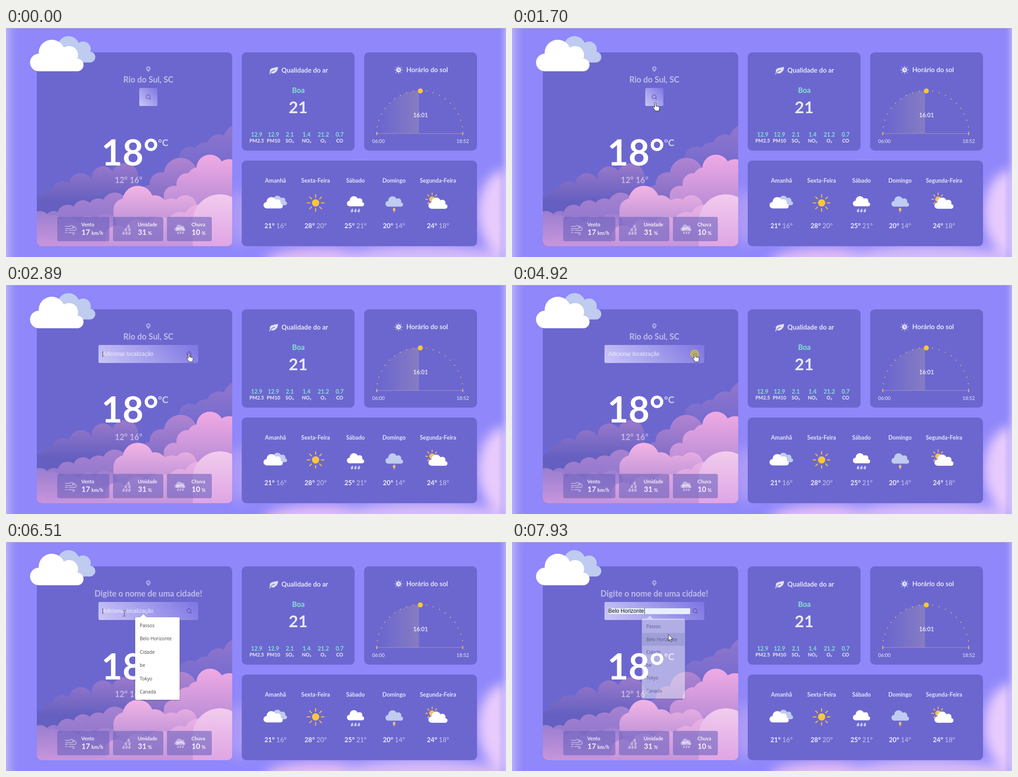
These frames come from a looping animation (1103x508 px, 8 s). An HTML page:

```html
<!DOCTYPE html>
<html lang="pt">
<head>
<meta charset="utf-8">
<style>
  html, body { margin: 0; width: 100%; height: 100%; overflow: hidden; background: #8f87fa; }
  svg { display: block; width: 1103px; height: 508px; }
  text { font-family: Lato, sans-serif; white-space: pre; }
  .field { font-family: "Liberation Sans", Arial, sans-serif; font-size: 12px; }
  .item { font-family: "Open Sans", "Noto Sans", sans-serif; font-size: 10.2px; fill: #444; }
</style>
</head>
<body>
<svg id="stage" viewBox="0 0 1103 508">
  <defs>
    <filter id="blur" x="-50%" y="-50%" width="200%" height="200%"><feGaussianBlur stdDeviation="13"/></filter>
    <filter id="shadow"><feDropShadow dx="0" dy="1" stdDeviation="1.5" flood-opacity=".3"/></filter>
    <linearGradient id="edge"><stop stop-color="#c9bdfc" stop-opacity=".75"/><stop offset="1" stop-color="#8f87fa" stop-opacity="0"/></linearGradient>
    <linearGradient id="day"><stop offset=".1" stop-color="#a89ab0" stop-opacity="0"/><stop offset="1" stop-color="#a89ab0" stop-opacity=".42"/></linearGradient>
    <linearGradient id="glass" gradientUnits="userSpaceOnUse"><stop stop-color="#cbc7f7"/><stop offset="1" stop-color="#7d75e2"/></linearGradient>
    <clipPath id="card"><rect x="68" y="54" width="431" height="430" rx="10"/></clipPath>
    <clipPath id="fieldClip"><rect id="fieldArea" y="133" height="40"/></clipPath>
    <g id="cloud">
      <circle cx="72.5" cy="76.5" r="19.5"/><circle cx="101" cy="55" r="29"/><circle cx="139" cy="60" r="20"/>
      <circle cx="157" cy="82" r="14"/><path d="M72 60h78v15l7 7v14H72z"/>
    </g>
    <g id="back" fill="#bfcbef">
      <circle cx="138" cy="42" r="24"/><circle cx="170" cy="47" r="17"/><circle cx="185" cy="64.5" r="12"/><path d="M138 45h46v31.500h-46z"/>
    </g>
    <path id="drop" d="M1.500-4.500C4-1 3 4 0 4S-4.200 0 1.500-4.500z"/>
  </defs>
  <rect width="1103" height="508" fill="#8f87fa"/>
  <g filter="url(#blur)">
    <ellipse cx="1103" cy="410" rx="62" ry="95" fill="#e8cbfd"/>
    <ellipse cx="690" cy="520" rx="120" ry="32" fill="#e3bdf5"/>
    <ellipse cx="920" cy="518" rx="190" ry="36" fill="#d6bbf9"/>
    <ellipse cx="515" cy="420" rx="22" ry="62" fill="#b09cf7"/>
  </g>
  <rect width="32" height="508" fill="url(#edge)"/>
  <rect width="18" height="508" fill="url(#edge)" transform="matrix(-1 0 0 1 1103 0)"/>
  <rect width="1103" height="1" fill="#b5b1c9"/>
  <g fill="#6c67cf">
    <rect x="68" y="54" width="431" height="430" rx="10"/>
    <rect x="520" y="54" width="249" height="218" rx="10"/>
    <rect x="790" y="54" width="249" height="218" rx="10"/>
    <rect x="520" y="294" width="519" height="190" rx="10"/>
  </g>
  <g id="sky" clip-path="url(#card)"></g>
  <use href="#back"/><use href="#cloud" fill="#fff"/>

  <path d="M314 98c-2-3-5-5-5-8a5 5 0 0 1 10 0c0 3-3 5-5 8zm0-10a2 2 0 1 0 .1 0z" fill="#a9a4e4"/>
  <g fill="#e1dff6" stroke="#e1dff6">
    <path d="M600 86c-7 3-19 1-18 11 2 5 9 5 13 1 4-3 5-7 5-12z" stroke="none"/>
    <path d="M582 102.500c2-5 6-8 11-9" fill="none" stroke="#6c67cf" stroke-width="1.300"/>
    <path d="M581.500 103c0-2 1-4 3-6" fill="none" stroke-width="1.500"/>
    <circle cx="866" cy="93" r="5.700" stroke="none"/>
    <path d="M866 90v3.500h3" fill="none" stroke="#6c67cf" stroke-width="1.200"/>
  </g>

  <path d="M818 234A95 95 0 0 1 911 139V234z" fill="url(#day)"/>
  <path d="M818 234H1008" stroke="#aa94bd"/>
  <path d="M818 230.500v7M1007.500 230.500v7" stroke="#f5c04c" stroke-width="2"/>
  <g id="arc" fill="#f3c24e"></g>
  <circle cx="914" cy="139.500" r="5.500" fill="#fac637"/>

  <g transform="translate(548.9 365.500) scale(.361)"><use href="#back"/><use href="#cloud" fill="#fff"/></g>
  <use href="#cloud" fill="#fff" transform="translate(735 364.600) scale(.322)"/>
  <g fill="#bfcbef">
    <use href="#drop" x="763" y="405"/><use href="#drop" x="770.500" y="405"/><use href="#drop" x="778" y="405"/>
    <use href="#cloud" transform="translate(819.500 364.600) scale(.33)"/>
  </g>
  <path d="M854.500 399h4.500l-2 4h3l-5.500 8 1.500-6h-3z" fill="#f9c860"/>
  <circle cx="683" cy="388" r="8" fill="#f9c73d"/>
  <circle cx="940" cy="380" r="6.500" fill="#f3c05e"/>
  <g id="rays"></g>
  <use href="#cloud" fill="#fff" transform="translate(913 366.700) scale(.356)"/>

  <g fill="#6a61be" fill-opacity=".58">
    <rect x="113" y="419" width="115" height="54" rx="4"/>
    <rect x="236" y="419" width="111" height="54" rx="4"/>
    <rect x="355" y="419" width="99" height="54" rx="4"/>
  </g>
  <g fill="#fff" fill-opacity=".42">
    <use href="#drop" x="270" y="440"/><use href="#drop" x="264" y="447"/><use href="#drop" x="272" y="447"/>
    <use href="#drop" x="259" y="455"/><use href="#drop" x="265.500" y="455"/><use href="#drop" x="272" y="455"/>
    <use href="#cloud" transform="translate(361.200 430.700) scale(.203)"/>
    <use href="#drop" transform="translate(379 454) scale(.75)"/><use href="#drop" transform="translate(384.500 454) scale(.75)"/><use href="#drop" transform="translate(390 454) scale(.75)"/>
  </g>
  <path d="M131 440h10m-10 5h13a3.500 3.500 0 1 0-3-5M148 440h3m-20 9h5m4 0h11a3.500 3.500 0 1 0-3-5M131 454h3m4 0h11a2 2 0 1 1-2 3" fill="none" stroke="#fff" stroke-opacity=".42" stroke-width="2" stroke-linecap="round"/>
  <g id="labels"></g>

  <text id="title" x="314" y="121" text-anchor="middle" font-size="18" font-weight="700" fill="#fff" fill-opacity=".56"></text>
  <rect id="box" y="133" height="40" rx="3" fill="url(#glass)"/>
  <rect id="fill" x="213" y="147" width="180" height="13" fill="#e8f0fe"/>
  <g clip-path="url(#fieldClip)"><text id="field" class="field" y="157.300"></text></g>
  <path id="caret" d="M0 147v13" stroke="#333"/>
  <g id="lens" fill="none" stroke="#55509f" stroke-width="1.200"><circle cx="-.5" cy="152.500" r="4.300"/><path d="M2.600 155.600l3 3"/></g>
  <g id="popup"></g>
  <circle id="click" r="10" fill="#c9c046" fill-opacity=".75"/>
  <g id="mouse"></g>
</svg>
<script>
const $ = id => document.getElementById(id);
const set = (id, attrs) => { for (const k in attrs) $(id).setAttribute(k, attrs[k]); };
const show = (id, on) => $(id).style.display = on ? '' : 'none';
const text = (x, y, s, size, alpha = .82, anchor = 'middle', weight = 700, fill = '#fff') =>
  `<text x="${x}" y="${y}" font-size="${size}" font-weight="${weight}" text-anchor="${anchor}" fill="${fill}" fill-opacity="${alpha}">${s}</text>`;

// Cloud bank, back to front: top colour, bottom colour, y range, puffs as x, y, radius
const bank = [
  ['#9177cd', '#6c67cf', 213, 335, [[518,252,40], [470,264,28], [440,281,27], [406,288,25], [380,312,22]]],
  ['#9a7acc', '#645fc0', 300, 385, [[262,330,30], [214,332,25], [165,348,26], [125,364,24], [98,376,19], [74,392,18]]],
  ['#b184d2', '#7769c4', 288, 400, [[385,325,37], [342,345,25], [318,368,20]]],
  ['#f0aae4', '#b188d5', 281, 410, [[450,311,30], [492,320,29], [424,333,24], [400,346,24], [370,372,22]]],
  ['#a681d1', '#8a75cc', 365, 450, [[240,393,28], [204,402,24], [170,404,22], [136,415,23], [105,424,18]]],
  ['#f4b4e5', '#b58ed6', 350, 445, [[291,384,34], [328,398,27], [262,403,25], [365,402,24], [396,396,25]]],
  ['#977ccf', '#c895dc', 400, 484, [[75,428,22], [102,434,20], [138,442,24], [180,438,22], [220,436,25]]],
  ['#e8b0e5', '#c595db', 395, 484, [[385,438,30], [340,450,32], [290,455,30], [425,424,32], [245,464,26]]],
  ['#f1cbed', '#dfa5e5', 370, 484, [[472,429,60]]]
];
$('sky').innerHTML = bank.map(([top, low, y1, y2, puffs], i) =>
  `<linearGradient id="puff${i}" gradientUnits="userSpaceOnUse" x1="0" x2="0" y1="${y1}" y2="${y2}">
   <stop stop-color="${top}"/><stop offset="1" stop-color="${low}"/></linearGradient>` +
  puffs.map(([x, y, r]) => `<rect x="${x - r}" y="${y - r}" width="${2 * r}" height="500" rx="${r}" fill="url(#puff${i})"/>`).join('')
).join('');

$('arc').innerHTML = Array.from({ length: 19 }, (_, i) => {
  const a = (i + 1) * Math.PI / 20;
  return `<circle cx="${913 - 95 * Math.cos(a)}" cy="${234 - 95 * Math.sin(a)}" r="1.100"/>`;
}).join('');

const rays = (x, y, from, to, color, width) => Array.from({ length: 8 }, (_, i) =>
  `<path d="M${from} 0H${to}" transform="translate(${x} ${y}) rotate(${i * 45})" stroke="${color}" stroke-width="${width}" stroke-linecap="round"/>`).join('');
$('rays').innerHTML = rays(683, 388, 12.5, 18.5, '#f9c73d', 2) + rays(940, 380, 10, 14, '#f3c05e', 2) + rays(866, 93, 7.8, 8.5, '#e1dff6', 1.6);

const air = [[553, '12.9', 'PM2.5'], [590, '12.9', 'PM10'], [626, '2.1', 'SO₂'], [663, '1.4', 'NO₂'], [700, '21.2', 'O₃'], [736, '0.7', 'CO']];
const days = [[594.5, 'Amanhã', 21, 16], [683, 'Sexta-Feira', 28, 20], [771, 'Sábado', 25, 21], [856, 'Domingo', 20, 14], [953, 'Segunda-Feira', 24, 18]];
const stats = [[166, 'Vento', 17, 'km/h'], [290.5, 'Umidade', 31, '%'], [409, 'Chuva', 10, '%']];
const green = '#82e4cf';
$('labels').innerHTML = [
  text(210.5, 305, '18°', 80, 1, 'start'),
  text(335.5, 262, '°C', 21, .68, 'start'),
  text(270.5, 344, '12° 16°', 18, .5),
  text(659, 99, 'Qualidade do ar', 14.6),
  text(929, 97.5, 'Horário do sol', 14.6),
  text(645, 144, 'Boa', 16.2, 1, 'middle', 700, green),
  text(644.5, 188.5, '21', 36, .86),
  text(914.5, 198, '16:01', 12.6),
  text(821.5, 254.5, '06:00', 10.8, .85, 'middle', 400),
  text(1007.5, 254.5, '18:52', 10.8, .85, 'middle', 400),
  ...air.map(([x, n, s]) => text(x, 241, n, 12.6, 1, 'middle', 700, green) + text(x, 254, s, 10.8, .88)),
  ...days.map(([x, s, hi, lo]) => text(x, 342.5, s, 12.6) +
    text(x, 444, `${hi}°<tspan font-weight="400" fill-opacity=".62"> ${lo}°</tspan>`, 14.4, .88)),
  ...stats.map(([x, s, n, unit]) => text(x, 440, s, 10.8, .88, 'start') +
    text(x + .5, 459, n, 16.2, .9, 'start') + text(x + 22.5, 459, unit, 10.8, .9, 'start'))
].join('');

const items = ['Passos', 'Belo Horizonte', 'Cidade', 'be', 'Tokyo', 'Canada'];
const rowTop = i => 170.5 + 29.4 * i;
$('popup').innerHTML = `<g filter="url(#shadow)"><path d="M295 168l8-8 8 8z" fill="#fff"/><rect x="285" y="167" width="98" height="183" rx="3" fill="#fff"/></g>
  <rect id="hover" x="285" width="98" height="29.400" fill="#dcdce2"/>` +
  items.map((s, i) => `<text class="item" x="295" y="${rowTop(i) + 18.5}">${s}</text>`).join('');

const outline = 'fill="#fff" stroke="#222" stroke-width="1"';
const cursors = {
  arrow: `<path d="M0 0V14l3.200-3 2.300 5.200 2.200-1-2.300-5H10z" ${outline}/>`,
  hand: `<path d="M-1.500 1c0-2 3-2 3 0v6l6 1.300c1.500.4 2 1.200 1.800 2.700l-1 7h-8l-5-7.500c-1-1.600.8-2.600 2-1.500l1.200 1.200z" ${outline}/>`,
  beam: '<path d="M-3.500-6.500h2.500l1 1 1-1h2.500M0-5.500v11M-3.500 6.500h2.500l1-1 1 1h2.500" fill="none" stroke="#444"/>'
};

// Pointer path: time, x, y
const path = [
  [580, 781, 453], [860, 345, 318], [930, 315, 272], [1350, 316, 182], [1410, 316, 182], [1830, 316, 158], [2110, 320, 157],
  [2250, 320, 157], [2890, 403.5, 152.5], [5250, 403.5, 152.5], [5460, 340, 168], [5780, 248, 158], [5920, 261, 158],
  [6790, 261, 158], [7100, 300, 172], [7590, 345, 205]
];
function pointer(t) {
  const i = path.findLastIndex(p => p[0] <= t), a = path[i], b = path[i + 1];
  if (!b) return a.slice(1);
  const step = a[0] + Math.floor((t - a[0]) / 70) * 70;
  const k = (step - a[0]) / (b[0] - a[0]);
  return [a[1] + (b[1] - a[1]) * k, a[2] + (b[2] - a[2]) * k];
}
const between = (v, a, b) => v >= a && v < b;
const clamp = v => Math.min(1, Math.max(0, v));

function draw(t) {
  const open = 1 - Math.pow(1 - clamp((t - 1860) / 500), 2.3);
  const w = 40 + 180 * open, left = 314 - w / 2, right = 314 + w / 2, d = (w + 40) / 4;
  set('box', { x: left, width: w });
  set('fieldArea', { x: left, width: w - 38 });
  set('glass', { x1: 314 - d, y1: 153 + d, x2: 314 + d, y2: 153 - d });
  set('lens', { transform: `translate(${right - 20} 0)` });
  $('title').textContent = t < 4990 ? 'Rio do Sul, SC' : 'Digite o nome de uma cidade!';

  const [x, y] = t < 580 ? [0, 0] : pointer(t);
  const overList = t >= 6450 && x > 285 && y > 167;
  const row = overList ? Math.max(0, Math.floor((y - rowTop(0)) / 29.4)) : -1;
  const inBox = between(y, 133, 173) && between(x, left, right);
  const onDigits = between(x, 213, 331) && between(y, 245, 310);
  const kind = overList ? 'arrow' : inBox ? (x > right - 38 ? 'hand' : 'beam') : onDigits ? 'beam' : 'arrow';
  show('mouse', t >= 580);
  $('mouse').innerHTML = cursors[kind];
  set('mouse', { transform: `translate(${x} ${y})` });

  const filled = row >= 0;
  show('fill', filled);
  $('field').textContent = filled ? items[row] : 'Adicionar localização';
  set('field', { x: left + 8.5, fill: filled ? '#111' : '#fff', 'fill-opacity': filled ? 1 : .8 });
  show('caret', between(t, 2890, 3420) || between(t, 3960, 4510) || between(t, 6450, 6980) || t >= 7720);
  set('caret', { transform: `translate(${t >= 7720 ? 292.5 : 213.5} 0)` });

  const fade = clamp((t - 7790) / 140);
  show('popup', t >= 6450);
  show('hover', filled);
  set('hover', { y: rowTop(row) });
  set('popup', {
    opacity: t < 6510 ? .5 : 1 - .53 * fade,
    transform: `translate(334 258) scale(${t < 6510 ? .97 : 1 - .03 * fade}) translate(-334 -258)`
  });

  const spot = between(t, 4920, 4990) ? [403, 153] : between(t, 6190, 6250) ? [253, 152] : between(t, 7720, 7790) ? [345, 205] : null;
  show('click', spot);
  if (spot) set('click', { cx: spot[0], cy: spot[1] });
}

const start = performance.now();
function frame() {
  draw((performance.now() - start) % 8000);
  requestAnimationFrame(frame);
}
frame();
</script>
</body>
</html>
```
